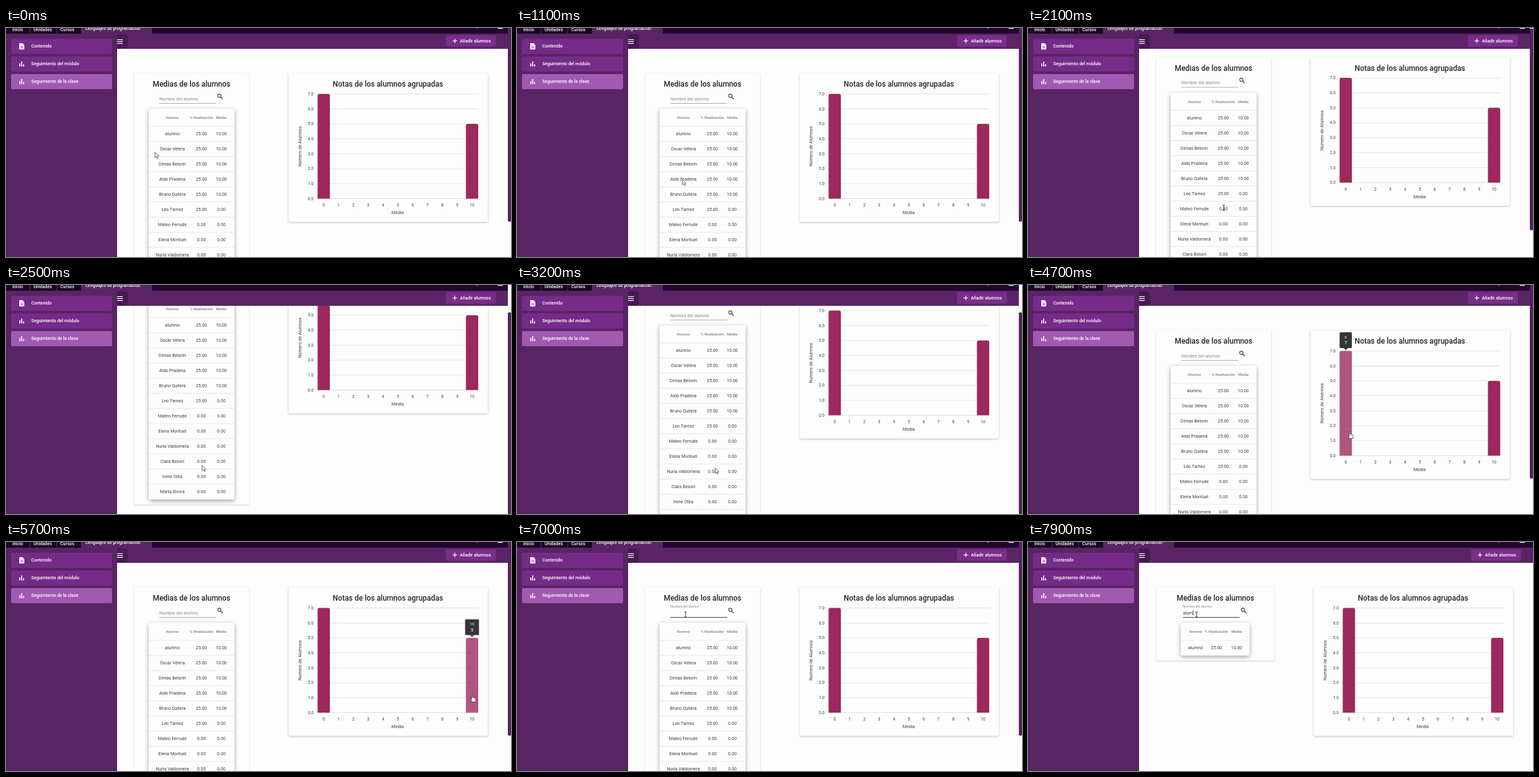
Recreate the animation shown at these times as an HTML page with a canvas. Size 800 px wide and 363 px high, loop 8000 ms.

```html
<!DOCTYPE html>
<html lang="es">
<head>
<meta charset="utf-8">
<style>
  html, body { margin: 0; width: 100%; height: 100%; overflow: hidden; background: #fdfdfd; }
  canvas { display: block; width: 800px; height: 363px; }
</style>
</head>
<body>
<canvas id="stage" width="800" height="363"></canvas>
<script>
const ctx = document.getElementById('stage').getContext('2d');
const LOOP = 8000, STEP = 100, TOP = 33;
const INK = '#3e3e3e';

const students = [
  ['alumno', 25, 10], ['Oscar Vélera', 25, 10], ['Dimas Belorín', 25, 10],
  ['Aldo Pradena', 25, 10], ['Bruno Quilera', 25, 10], ['Leo Tarnez', 25, 0],
  ['Mateo Ferrude', 0, 0], ['Elena Montuel', 0, 0], ['Nuria Valdomera', 0, 0],
  ['Clara Besorí', 0, 0], ['Irene Olba', 0, 0], ['Marta Elvore', 0, 0]
];

// Keyframes: time, values..., optional cursor shape
const scrollKeys = [[1900, 0], [2000, 25.5], [2100, 25.5], [2200, 80], [2300, 104],
  [3100, 104], [3200, 64], [3300, 24], [3400, 5], [3500, 0]];
const pointerKeys = [
  [0, 236, 197, 'arrow'], [600, 262, 240, 'arrow'], [1400, 262, 240, 'arrow'],
  [1900, 310, 285, 'beam'], [2400, 310, 285, 'arrow'], [3000, 314, 290, 'arrow'],
  [3200, 314, 290, 'arrow'], [3500, 374, 294, 'arrow'], [4000, 480, 252, 'arrow'],
  [4100, 500, 246, 'hand'], [4700, 511, 238, 'hand'], [5000, 516, 240, 'arrow'],
  [5400, 730, 250, 'hand'], [5700, 740, 248, 'hand'], [5800, 739, 208, 'hand'],
  [6100, 734, 180, 'hand'], [6250, 700, 175, 'arrow'], [6500, 267, 115, 'beam']
];
const typing = [[7400, 'a'], [7500, 'al'], [7600, 'alu'], [7900, 'alum']];
const FOCUS = 6500;

const clamp = v => Math.max(0, Math.min(1, v));
const mix = (a, b, k) => a + (b - a) * k;

function sample(keys, t) {
  let i = 0;
  while (i < keys.length - 1 && keys[i + 1][0] <= t) i++;
  const a = keys[i], b = keys[i + 1] || a;
  const k = a === b ? 0 : clamp((t - a[0]) / (b[0] - a[0]));
  return a.slice(1).map((v, n) => typeof v === 'number' ? mix(v, b[n + 1], k) : v);
}

function rect(x, y, w, h, color, radius = 0) {
  ctx.fillStyle = color;
  ctx.beginPath();
  ctx.roundRect(x, y, w, h, radius);
  ctx.fill();
}

function line(points, color, width = 1) {
  ctx.strokeStyle = color;
  ctx.lineWidth = width;
  ctx.beginPath();
  points.forEach(([x, y]) => ctx.lineTo(x, y));
  ctx.stroke();
}

// y is the middle of the capitals
function text(str, x, y, size, color, align = 'left', weight = 400) {
  ctx.font = `${weight} ${size}px Roboto, sans-serif`;
  ctx.fillStyle = color;
  ctx.textAlign = align;
  ctx.fillText(str, x, y + size * 0.355);
}

function card(x, y, w, h, blur, alpha) {
  ctx.save();
  ctx.shadowColor = `rgba(0,0,0,${alpha})`;
  ctx.shadowBlur = blur;
  ctx.shadowOffsetY = blur / 3;
  rect(x, y, w, h, '#fdfdfd', 2);
  ctx.restore();
}

function searchField(x, query, t) {
  const float = clamp((t - FOCUS + STEP) / 200);
  const focused = t >= FOCUS;
  text('Nombre del alumno', x, mix(112.5, 102.5, float), mix(7, 5.25, float), '#8a8a8a');
  text(query, x, 112.5, 7, INK);
  line([[x, 119.5], [x + 90, 119.5]], focused ? '#444' : '#999', focused ? 1 : 0.8);

  const lastKey = typing.filter(k => k[0] <= t).pop();
  const since = t - (lastKey ? lastKey[0] : FOCUS);
  if (focused && since % 1000 < 500) {
    ctx.font = '400 7px Roboto, sans-serif';
    rect(x + ctx.measureText(query).width + 0.2, 108, 0.8, 8, '#333');
  }
  ctx.strokeStyle = '#444';
  ctx.lineWidth = 1.1;
  ctx.beginPath();
  ctx.arc(x + 95, 107.5, 2.6, 0, 7);
  ctx.stroke();
  line([[x + 97, 109.5], [x + 100.3, 112.8]], '#444', 1.4);
}

function studentCard(query, rows, narrow, t) {
  const mid = narrow ? 297 : 294;
  const left = narrow ? 204 : 203, width = narrow ? 186 : 182;
  const single = rows.length === 1;
  const tableW = single ? 109 : 136, x = mid - tableW / 2 - (single ? 0.5 : 0);
  const cols = single ? [265.5, 298.5, 330.5] : [mid - 30.5, mid + 15.5, mid + 47];
  const tableH = 28 + rows.length * 24;

  card(left, 72, width, tableH + 64, 2.5, 0.2);
  text('Medias de los alumnos', mid, 89, 11.9, '#262626', 'center', 500);
  searchField(narrow ? 245.5 : 243, query, t);

  card(x, 128, tableW, tableH, 7, 0.36);
  ['Alumno', '% Realización', 'Media'].forEach((h, i) =>
    text(h, cols[i], 142, 6, '#7c7c7c', 'center', 500));
  rows.forEach(([name, done, mean], i) => {
    const y = 156 + i * 24;
    rect(x, y - 0.5, tableW, 0.8, '#dedede');
    [name, done.toFixed(2), mean.toFixed(2)].forEach((v, c) =>
      text(v, cols[c], y + 12, 7, INK, 'center'));
  });
}

function bar(x, value, hovered) {
  const top = 270.5 - value * 23.71;
  ctx.globalAlpha = hovered ? 0.78 : 1;
  rect(x - 9.7, top, 19.5, 270.5 - top, '#9d285d', [3, 3, 0, 0]);
  ctx.globalAlpha = 1;
}

function tooltip(x, label, value) {
  const top = 270.5 - value * 23.71 - 29.5, half = label > 9 ? 11 : 9.7;
  rect(x - half, top, half * 2, 25, '#35363a', 1.5);
  ctx.beginPath();
  ctx.moveTo(x - 3.5, top + 25);
  ctx.lineTo(x + 3.5, top + 25);
  ctx.lineTo(x, top + 28);
  ctx.fill();
  text(label, x, top + 7.5, 6, '#fff', 'center');
  text(value, x, top + 16.5, 8, '#fff', 'center');
}

function chartCard(dx, hover) {
  ctx.save();
  ctx.translate(dx, 0);
  card(447.5, 72, 316, 235.5, 3, 0.26);
  text('Notas de los alumnos agrupadas', 605, 89, 11.9, '#262626', 'center', 500);
  for (let v = 0; v <= 7; v++) {
    const y = 270.5 - v * 23.71;
    rect(493, y - 0.4, 255, 0.8, '#dedede');
    text(v.toFixed(1), 487, y, 6.4, INK, 'right');
  }
  const barX = v => 503.3 + v * 23.5;
  for (let v = 0; v <= 10; v++) text(v, barX(v), 281, 6.4, INK, 'center');
  text('Media', 620.5, 293, 7, INK, 'center');
  ctx.save();
  ctx.translate(465.5, 187.5);
  ctx.rotate(-Math.PI / 2);
  text('Número de Alumnos', 0, 0, 7, INK, 'center');
  ctx.restore();
  const bars = [[0, 7], [10, 5]];
  bars.forEach(([v, n]) => bar(barX(v), n, hover === v));
  bars.forEach(([v, n]) => { if (hover === v) tooltip(barX(v), v, n); });
  ctx.restore();
}

function barsIcon(x, y) {
  [[0, 5], [3, 8], [6, 3.5]].forEach(([dx, h]) => rect(x + dx, y - h, 1.6, h, '#fff'));
}

function documentIcon(x, y) {
  ctx.fillStyle = '#fff';
  ctx.beginPath();
  [[0, 0], [5, 0], [8, 3], [8, 10], [0, 10]].forEach(([a, b]) => ctx.lineTo(x + a, y + b));
  ctx.fill();
  rect(x + 1.8, y + 4.7, 4.4, 0.9, '#742a86');
  rect(x + 1.8, y + 6.9, 4.4, 0.9, '#742a86');
}

function frame(dx) {
  const purple = '#5b2467';
  rect(0, 0, 800, TOP, purple);
  rect(0, 9, 176, 354, '#582463');
  rect(0, 0, 800, 9, '#23062e');
  [[4, 33], [40, 39], [82, 36]].forEach(([x, w]) => rect(x, 0, w, 9, '#1b0324', [0, 0, 2, 2]));
  [37.5, 79.5].forEach(x => rect(x, 0, 1.5, 9, '#4a1b57'));
  rect(119, 0, 112, 10, purple);
  text('Inicio', 10, 3, 7, '#fff', 'left', 500);
  text('Unidades', 43.5, 2.5, 7, '#fff', 'left', 500);
  text('Cursos', 86, 3, 7, '#fff', 'left', 500);
  text('Lenguajes de programación', 126, 1, 7, '#fff', 'left', 500);
  rect(779, 0, 8, 1.2, '#fff');
  rect(745, 0, 2, 0.8, '#bbb');

  rect(176, 10, 17, 23, '#471a52', [0, 5, 5, 0]);
  [18.5, 21.5, 24.5].forEach(y => rect(176, y - 0.6, 9, 1.2, '#fff'));
  rect(697 + dx, 11.5, 79, 18, '#7a2d8b', 2);
  rect(707.5 + dx, 19.9, 7, 1.2, '#fff');
  rect(710.4 + dx, 17, 1.2, 7, '#fff');
  text('Añadir alumnos', 719 + dx, 20.5, 7, '#fff', 'left', 500);

  ['Contenido', 'Seguimiento del módulo', 'Seguimiento de la clase'].forEach((label, i) => {
    const y = 17 + i * 28;
    rect(8, y, 160, 24, i === 2 ? '#a259b2' : '#762b88', 2);
    if (i) barsIcon(21, y + 16);
    else documentIcon(21, y + 7);
    text(label, 40, y + 12, 7, '#fff', 'left', 500);
  });
}

// The bar trails the page by one step
function scrollbar(t) {
  const [offset] = sample(scrollKeys, t - STEP);
  rect(795, 0, 5, 363, '#fafafa');
  rect(795, -13 + offset * 0.54, 5, 320, '#55215f', 2);
}

function outline(points, fill, stroke) {
  ctx.beginPath();
  points.forEach(([x, y]) => ctx.lineTo(x, y));
  ctx.closePath();
  ctx.fillStyle = fill;
  ctx.fill();
  ctx.strokeStyle = stroke;
  ctx.lineWidth = 0.8;
  ctx.stroke();
}

function pointer(x, y, shape) {
  ctx.save();
  ctx.translate(x, y);
  if (shape === 'arrow') {
    outline([[0, 0], [0, 8.5], [2, 6.7], [3.4, 9.8], [4.8, 9.2], [3.4, 6.2], [6, 6]], '#fff', '#444');
  } else if (shape === 'beam') {
    line([[0, -4], [0, 4]], '#333');
    [-4, 4].forEach(e => line([[-2, e], [2, e]], '#333', 0.9));
  } else {
    outline([[-2, -5.5], [-0.5, -5.5], [-0.3, -1.5], [3.7, -0.5], [4.2, 1], [3.5, 5.5],
      [-1.3, 5.5], [-4, 1.5], [-3.5, 0.5], [-2, 1.5]], '#fff', '#333');
  }
  ctx.restore();
}

function hoveredBar(t) {
  if (t >= 4100 && t < 5000) return 0;
  if (t >= 5400 && t < 6300) return 10;
  return -1;
}

function draw(t) {
  const query = (typing.filter(k => k[0] <= t).pop() || [0, ''])[1];
  const rows = students.filter(s => s[0].toLowerCase().includes(query));
  const narrow = rows.length < 9;
  const dx = narrow ? 5 : 0;
  const [scroll] = sample(scrollKeys, t);

  rect(0, 0, 800, 363, '#fdfdfd');
  frame(dx);
  ctx.save();
  ctx.beginPath();
  ctx.rect(176, TOP, 624, 363 - TOP);
  ctx.clip();
  ctx.translate(0, -scroll);
  studentCard(query, rows, narrow, t);
  chartCard(dx, hoveredBar(t));
  ctx.restore();
  if (!narrow) scrollbar(t);
  pointer(...sample(pointerKeys, t));
}

function tick() {
  draw(Math.floor(performance.now() % LOOP / STEP) * STEP);
  requestAnimationFrame(tick);
}
tick();
</script>
</body>
</html>
```
